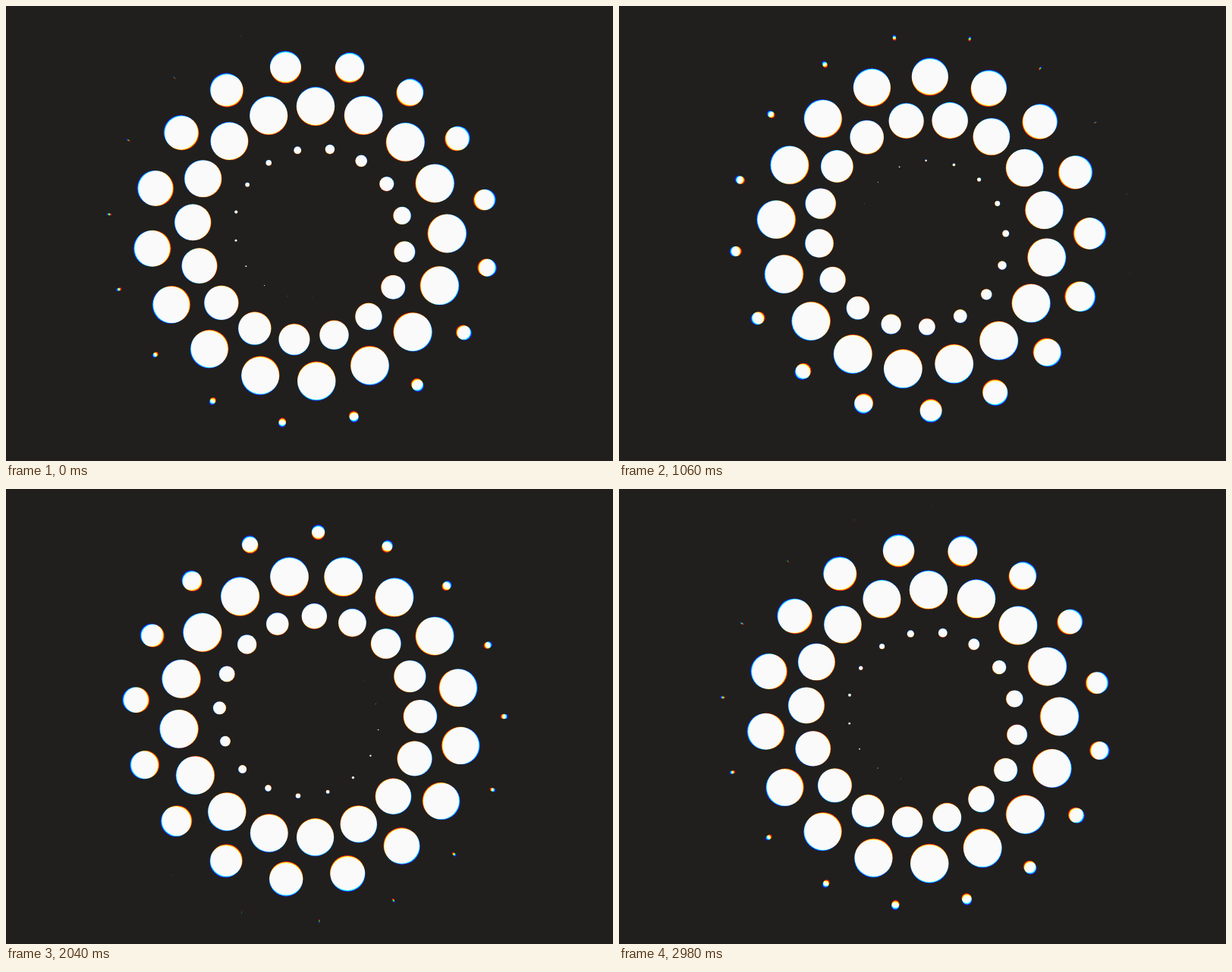
Recreate the animation shown at these times as an HTML page with a canvas. Size 800 px wide and 600 px high, loop 3 s.

```html
<!DOCTYPE html>
<html lang="en">
<head>
<meta charset="utf-8">
<title>Spiral of dots</title>
<style>
  html, body { margin: 0; height: 100%; overflow: hidden; background: #201f1d; }
  canvas { display: block; }
</style>
</head>
<body>
<canvas id="stage" width="800" height="600"></canvas>
<script>
const ctx = document.getElementById('stage').getContext('2d');
const LOOP = 3000;
const PER_LOOP = 33;           // spiral steps travelled in one loop
const DOTS = 2 * PER_LOOP;     // each dot lives for two loops
const MID = 181.4, REACH = 110.8;
const MAX_SIZE = 25.4;
const FRINGE = 1.5 / 252 ** 2; // colour split grows with the squared radius
const CHANNELS = [
  ['rgb(218,0,0)', -1],
  ['rgb(0,219,0)', 0],
  ['rgb(0,0,221)', 1]
];

const ease = p => p < 0.5 ? 4 * p ** 3 : 1 - 4 * (1 - p) ** 3;

function draw(now) {
  const t = (now % LOOP) / LOOP;
  ctx.globalCompositeOperation = 'source-over';
  ctx.fillStyle = '#201f1d';
  ctx.fillRect(0, 0, 800, 600);
  ctx.globalCompositeOperation = 'lighter';

  for (let i = 0; i < DOTS; i++) {
    const life = ((i / PER_LOOP + t) / 2) % 1;
    const offset = 2 * life - 1;
    const radius = MID + REACH * offset;
    const size = MAX_SIZE * ease(1 - Math.abs(offset));
    const angle = i * 4 * Math.PI / PER_LOOP;

    for (const [color, shift] of CHANNELS) {
      const r = radius + shift * FRINGE * radius ** 2;
      ctx.fillStyle = color;
      ctx.beginPath();
      ctx.arc(400 + r * Math.cos(angle), 300 + r * Math.sin(angle), size, 0, 2 * Math.PI);
      ctx.fill();
    }
  }
}

function tick() {
  draw(performance.now());
  requestAnimationFrame(tick);
}
tick();
</script>
</body>
</html>
```
